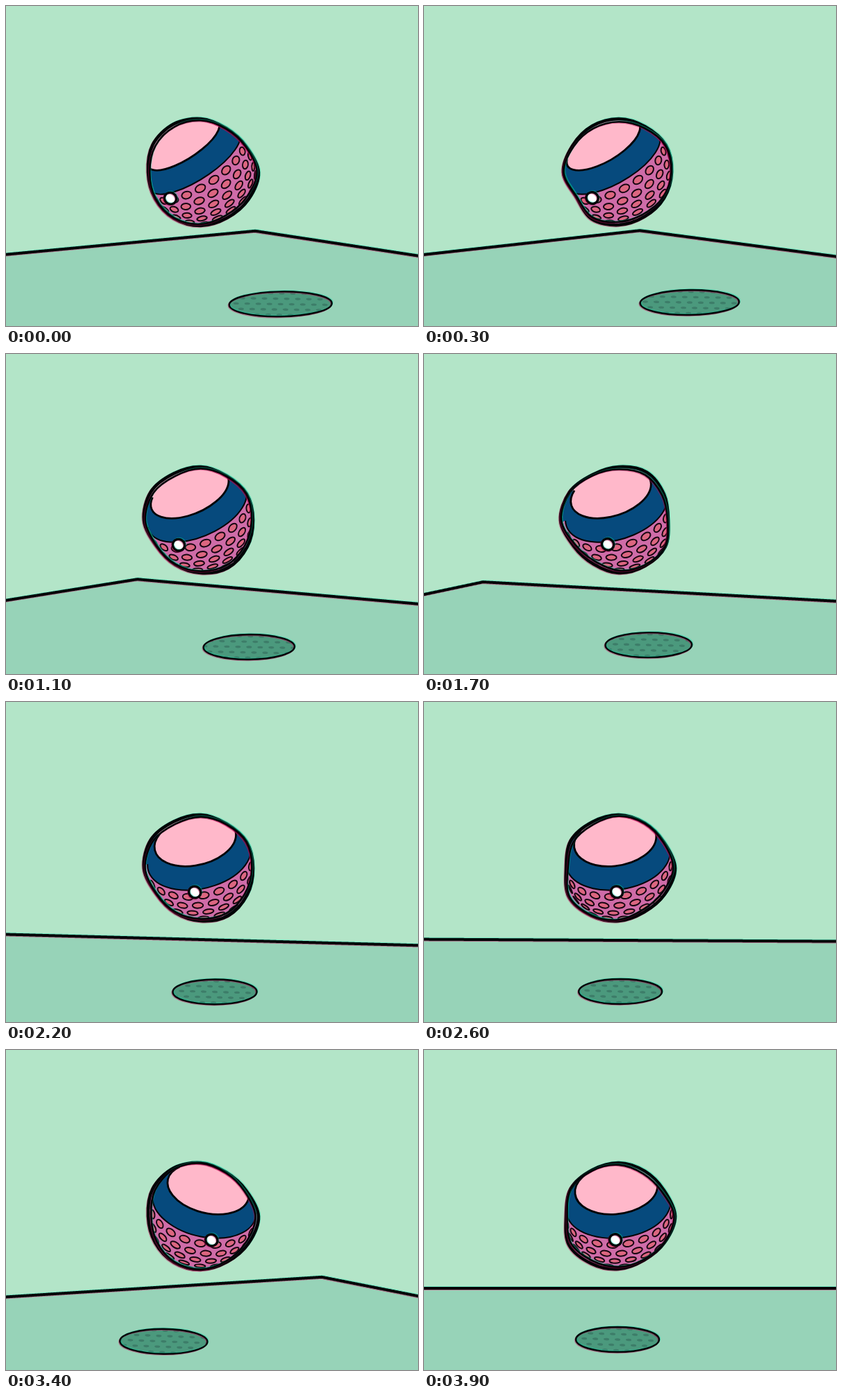
Write an HTML page with a canvas that moves like this. It is 594 by 462 pixels and loops after 4000 ms.

```html
<!DOCTYPE html>
<html lang="en">
<head>
<meta charset="utf-8">
<title>Wobbling ball</title>
<style>
  html, body { margin: 0; width: 100%; height: 100%; overflow: hidden; background: #b3e5c8; }
  canvas { display: block; }
</style>
</head>
<body>
<canvas id="stage" width="594" height="462"></canvas>
<script>
const ctx = document.getElementById('stage').getContext('2d');
const W = 594, H = 462, LOOP = 4000, STEP = 100;
const CX = 282, CY = 240, R = 78, TILT = 38 * Math.PI / 180;
const { sin, cos, PI, sqrt, asin, atan2, max } = Math;
const rad = d => d * PI / 180;

// step, room yaw, ball yaw, x of the white button
const KEYS = [
  [0, 54, 56, 237], [6, 42.5, 42.5, 248], [11, 33.7, 33.7, 249],
  [17, 21.5, 24, 265], [26, 2, 12, 278], [30, -6, -2, 283],
  [33, -30, -24, 300], [36, -14, -6, 289], [39, 0, 9, 276]
];

// radii of the hand-drawn outlines, every 30 degrees
const SHAPES = [
  [85, 81, 78, 79, 79, 78, 78, 82, 82, 79, 75, 77],
  [76, 82, 80, 78, 76, 75, 82, 84, 82, 79, 79, 77],
  [77, 79, 81, 78, 76, 76, 84, 85, 80, 79, 76, 78],
  [73, 79, 78, 78, 75, 77, 86, 84, 78, 79, 82, 77],
  [83, 78, 75, 78, 81, 85, 78, 82, 79, 79, 77, 77],
  [78, 77, 76, 78, 80, 73, 82, 79, 79, 79, 78, 80]
];
const ORDER = '0425131402524130532415203142503152043514';

function pose(step) {
  const i = max(1, KEYS.findIndex(k => k[0] >= step));
  const a = KEYS[i - 1], b = KEYS[i], f = (step - a[0]) / (b[0] - a[0]);
  return a.map((v, j) => v + (b[j] - v) * f);
}

// dark line with a faint colour fringe
function ink(path, width) {
  for (const [d, color] of [[-1, 'rgba(190,0,80,.45)'], [1, 'rgba(0,215,165,.4)'], [0, '#020306']]) {
    ctx.save();
    ctx.translate(d, -d);
    ctx.strokeStyle = color;
    ctx.lineWidth = width;
    ctx.stroke(path);
    ctx.restore();
  }
}

function fill(path, color) {
  ctx.fillStyle = color;
  ctx.fill(path);
}

// foot of a wall turned by angle a, as height at CX and slope
function wall(a) {
  const d = 1 + 1.456 * cos(a);
  return [205.6 + 340 * cos(a) / d, 0.35 * sin(a) / d];
}

function drawRoom(yaw) {
  const facing = [-PI / 2, 0, PI / 2].map(q => yaw + q).filter(a => cos(a) > 0);
  const walls = facing.map(wall);
  const edge = x => max(...walls.map(([y, m]) => y + m * (x - 284)));
  const line = new Path2D(), floor = new Path2D();
  floor.moveTo(-6, H);
  for (let x = -6; x <= W + 6; x++) {
    line.lineTo(x, edge(x));
    floor.lineTo(x, edge(x));
  }
  floor.lineTo(W + 6, H);
  fill(floor, '#97d3b8');
  ink(line, 4);
}

function drawShadow(yaw) {
  const s = sin(yaw), k = 1 - cos(yaw), rx = 60 + 34 * k;
  ctx.save();
  ctx.translate(279 + s * (118 + 64 * k), 418 + 30 * k);
  ctx.rotate(-0.02 * s);
  const oval = new Path2D();
  oval.ellipse(0, 0, rx, 18, 0, 0, 2 * PI);
  fill(oval, '#4b997d');
  ctx.save();
  ctx.clip(oval);
  ctx.fillStyle = '#3d7d69';
  for (let r = -2; r <= 2; r++) {
    for (let c = -6; c <= 6; c++) {
      ctx.beginPath();
      ctx.ellipse(c * 16 + r * 7, r * 8 + c * 0.5, 4, 1.7, 0.05, 0, 2 * PI);
      ctx.fill();
    }
  }
  ctx.restore();
  ink(oval, 2.4);
  ctx.restore();
}

// smooth closed curve through points spaced evenly by angle
function blob(radii) {
  const n = radii.length, p = new Path2D();
  const at = i => {
    const a = 2 * PI * i / n, r = radii[(i + n) % n];
    return [281 + r * cos(a), 240 + r * sin(a)];
  };
  p.moveTo(...at(0));
  for (let i = 0; i < n; i++) {
    const [a, b, c, d] = [at(i - 1), at(i), at(i + 1), at(i + 2)];
    p.bezierCurveTo(
      b[0] + (c[0] - a[0]) / 6, b[1] + (c[1] - a[1]) / 6,
      c[0] - (d[0] - b[0]) / 6, c[1] - (d[1] - b[1]) / 6, ...c);
  }
  p.closePath();
  return p;
}

// everything within the given angle of the pole, seen on the sphere
function drawZone(pole, angle, color, width) {
  const len = Math.hypot(pole[0], pole[1]), h = R * cos(angle);
  const mid = h * len, rim = h / len;
  const a = R * sin(angle), b = a * sqrt(1 - len * len);
  const t = -asin(Math.min(1, (rim - mid) / b));
  const arc = new Path2D();
  arc.ellipse(0, -mid, a, b, 0, t, PI - t);
  const area = new Path2D(arc);
  for (const [x, y] of [[-200, -rim], [-200, -200], [200, -200], [200, -rim]]) area.lineTo(x, y);
  ctx.save();
  ctx.translate(CX, CY);
  ctx.rotate(atan2(pole[0], pole[1]));
  fill(area, color);
  ctx.strokeStyle = '#020306';
  ctx.lineWidth = width;
  ctx.stroke(arc);
  ctx.restore();
}

function drawSpots(axes) {
  const [side, pole, front] = axes;
  const mix = (a, b, c) => side.map((v, i) => v * a + pole[i] * b + front[i] * c);
  ctx.fillStyle = '#dc6680';
  ctx.strokeStyle = '#180611';
  ctx.lineWidth = 2;
  for (let row = 0; row < 7; row++) {
    const g = rad(84 + row * 12), n = Math.round(21 * sin(g));
    for (let i = 0; i < n; i++) {
      const l = 2 * PI * (i + row % 2 / 2) / n;
      const p = mix(sin(g) * sin(l), cos(g), sin(g) * cos(l));
      if (p[2] < 0.08) continue;
      const u = mix(cos(l), 0, -sin(l));
      const v = mix(cos(g) * sin(l), -sin(g), cos(g) * cos(l));
      ctx.save();
      ctx.transform(u[0] * 7.8, -u[1] * 7.8, v[0] * 5.5, -v[1] * 5.5, CX + R * p[0], CY - R * p[1]);
      ctx.beginPath();
      ctx.arc(0, 0, 1, 0, 2 * PI);
      ctx.restore();
      ctx.fill();
      ctx.stroke();
    }
  }
}

function drawBall(step, yaw, buttonX) {
  const turn = ([x, y, z]) => [x * cos(yaw) - z * sin(yaw), y, x * sin(yaw) + z * cos(yaw)];
  const axes = [[1, 0, 0], [0, cos(TILT), sin(TILT)], [0, -sin(TILT), cos(TILT)]].map(turn);
  const radii = SHAPES[ORDER[step]].map(r => r - 2);
  const body = blob(radii);
  const inner = blob(radii.map((r, i) => r - 2.2 - 2.2 * sin(i * PI / 3 + step * 1.7)));

  ctx.save();
  ctx.clip(body);
  fill(body, '#cf6ca8');
  drawSpots(axes);
  drawZone(axes[1], rad(76), '#064a7d', 2);
  drawZone(axes[1], rad(50), '#ffb8ca', 2.8);
  ctx.restore();
  ink(body, 4.6);
  ink(inner, 2.6);

  const button = new Path2D();
  button.ellipse(buttonX, 274 + 5.5 * sin(yaw) ** 2, 8.8, 8.2, 0.5, 0, 2 * PI);
  fill(button, '#fff');
  ink(button, 3.4);
}

function draw(step) {
  const [, room, ball, buttonX] = pose(step);
  ctx.fillStyle = '#b3e5c8';
  ctx.fillRect(0, 0, W, H);
  drawRoom(rad(room));
  drawShadow(rad(room));
  drawBall(step, rad(ball), buttonX);
}

ctx.lineJoin = 'round';
let start, shown = -1;
function tick(now) {
  start ??= now;
  const step = Math.floor(max(0, now - start) % LOOP / STEP);
  if (step !== shown) draw(shown = step);
  requestAnimationFrame(tick);
}
draw(0);
requestAnimationFrame(tick);
</script>
</body>
</html>
```
